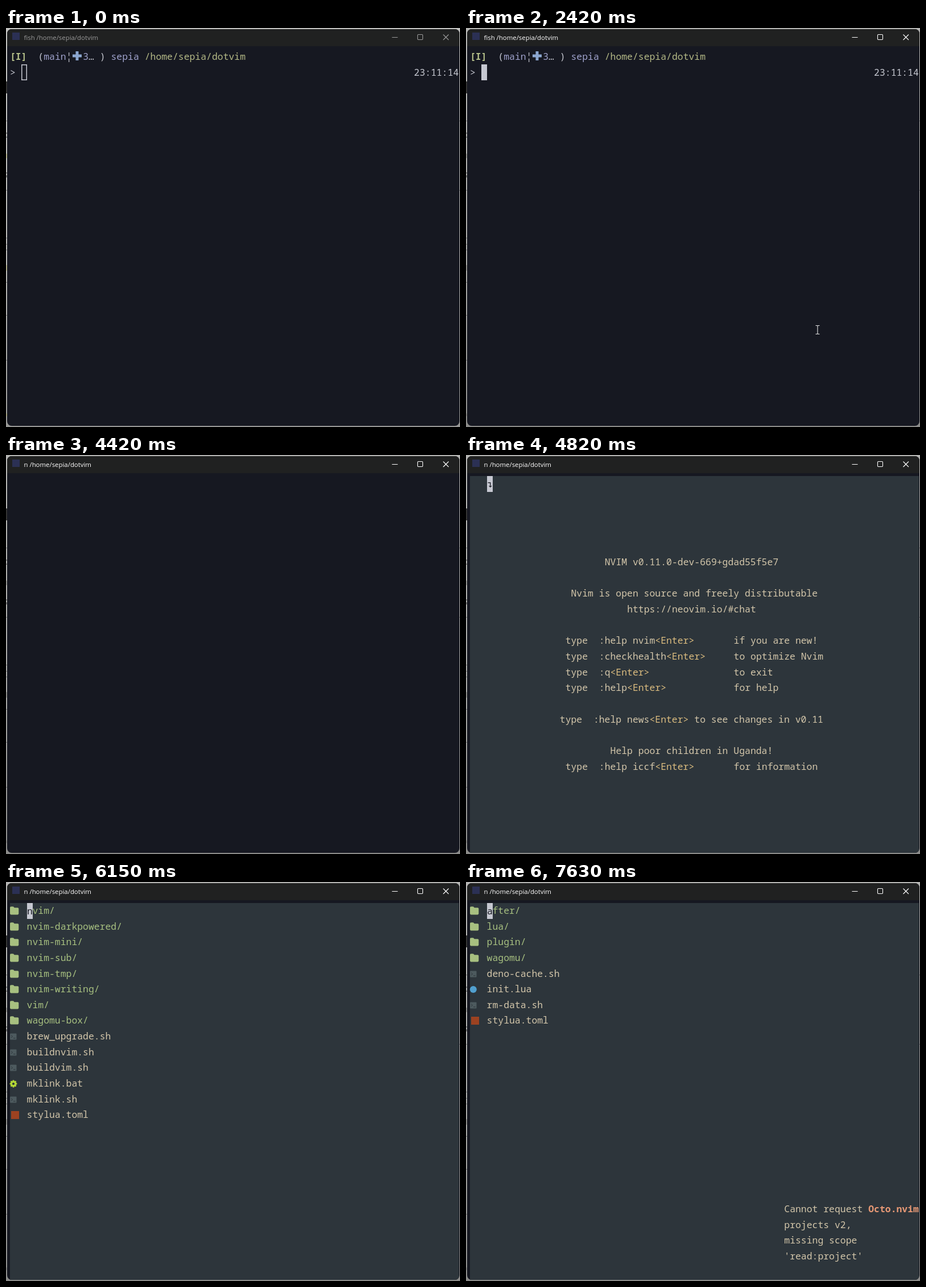
These frames come from a looping animation (798x702 px, 8 s). An HTML page:

```html
<!DOCTYPE html>
<html lang="en">
<head>
<meta charset="utf-8">
<title>Terminal session</title>
<style>
html, body { margin: 0; width: 100%; height: 100%; overflow: hidden; background: #b4b4b2; }
#stage { position: absolute; left: 0; top: 0; width: 798px; height: 702px; overflow: hidden; background: linear-gradient(#c2c2c0, #b4b4b2 60%, #989896); }
#stage.focus { background: linear-gradient(#b6b6b4, #a6a6a4 60%, #8c8c8a); }
#stage * { position: absolute; }
#stage span span { position: static; }
.mark { background: #333; }
.tint { background: #a3a05c; }
.focus .tint { background: #70706c; }
#view { left: 1.5px; top: 1.5px; width: 795px; height: 698.5px; border-radius: 8px; overflow: hidden; background: #161821; }
#page { left: -1.5px; top: -1.5px; width: 798px; height: 702px; }
#bar { left: 0; top: 0; width: 798px; height: 31.5px; background: #202121; color: #9b9b9b; }
.focus #bar { color: #fff; }
#name { left: 31.5px; top: 7px; font: 11.4px/19px 'Open Sans', 'Noto Sans', sans-serif; white-space: pre; }
#logo { left: 11px; top: 8px; width: 13px; height: 13px; background: #2b3054; }
.cell { font: 16.4375px/27.64px 'Noto Sans Mono', 'DejaVu Sans Mono', monospace; white-space: pre; }
.scene { left: 0; top: 0; width: 798px; height: 702px; display: none; }
#nvim { left: 7px; top: 37px; width: 789px; height: 664px; background: #2d353b; display: none; }
#cursor { width: 10px; height: 28px; background: #c6c8d1; color: #161821; }
#cursor.hollow { background: none; box-shadow: inset 0 0 0 1.5px #c6c8d1; }
#shell { color: #c6c8d1; }
#intro, #list, #sub, #note { color: #d3c6aa; }
.ok { color: #b9c48c; }
.path { color: #b4b986; }
.git { color: #9fa2cb; }
.dir { color: #a7c080; }
.key { color: #dbbc7f; }
.warn { color: #e69875; }
b { position: static !important; }
svg { overflow: visible; }
</style>
</head>
<body>
<div id="stage">
  <div id="marks"></div>
  <div id="view"><div id="page">
    <div id="bar">
      <div id="logo"></div>
      <div id="name"></div>
      <svg width="798" height="32" fill="none" stroke="currentColor" stroke-width="1.1">
        <path d="M678.5 16.5h10M768.5 11.5l9.5 9.5m0-9.5l-9.5 9.5"/>
        <rect x="723.5" y="11.5" width="9" height="9" rx="1.2"/>
      </svg>
    </div>
    <div id="nvim"></div>
    <div class="scene" id="shell"></div>
    <div class="scene" id="intro"></div>
    <div class="scene" id="list"></div>
    <div class="scene" id="sub"></div>
    <div class="scene" id="note"></div>
    <div class="cell" id="cursor"></div>
    <svg id="mouse" width="1" height="1" fill="none" stroke="#e8e8e8" stroke-width="1.1">
      <path d="M-3.5-7.5h2.5l1 .8 1-.8h2.5M0-7v14M-3.5 7.5h2.5l1-.8 1 .8h2.5"/>
    </svg>
  </div></div>
</div>
<script>
const LOOP = 8000, CW = 9.8625, RH = 27.64, LEFT = 7, TOP = 37;
const $ = id => document.getElementById(id);
const colX = c => LEFT + c * CW, rowY = r => TOP + r * RH;

function put(scene, row, col, html, cls = '') {
  const el = document.createElement('span');
  el.className = 'cell ' + cls;
  el.style.left = colX(col) + 'px';
  el.style.top = rowY(row) - 1 + 'px';
  el.innerHTML = html;
  $(scene).append(el);
  return el;
}

function icon(scene, row, shape) {
  $(scene).insertAdjacentHTML('beforeend',
    `<svg width="20" height="28" style="left:${LEFT}px;top:${rowY(row)}px">${shape}</svg>`);
}

const teeth = [0, 45, 90, 135].map(a =>
  `<rect x="4.4" y="11.6" width="3.2" height="12.8" rx="1" transform="rotate(${a} 6 18)"/>`).join('');
const ICONS = {
  dir: '<path fill="#a7c080" d="M0 8q0-1.8 1.8-1.8h4l2 2h5.7q1.8 0 1.8 1.8v8.6q0 1.8-1.8 1.8H1.8Q0 20.4 0 18.6z"/>',
  sh: '<rect y="8.5" width="11.5" height="11" rx="1" fill="#4d5a5e"/><path d="M2 11.5l2.5 2.3L2 16m4 .8h3.5" fill="none" stroke="#2d353b"/>',
  bat: `<g fill="#b5d936" transform="translate(0 -4)">${teeth}<circle cx="6" cy="18" r="4.8"/><circle cx="6" cy="18" r="2.1" fill="#2d353b"/></g>`,
  toml: '<rect x="2" y="7" width="14" height="14" fill="#9c4221"/>',
  lua: '<circle cx="5.8" cy="14" r="6" fill="#51a0cf"/>'
};

function listing(scene, names) {
  names.forEach((name, row) => {
    const type = name.endsWith('/') ? 'dir' : name.split('.').pop();
    icon(scene, row, ICONS[type]);
    put(scene, row, 3, name, type === 'dir' ? 'dir' : '');
  });
}

// Shell prompt
put('shell', 0, 0, '<b>[I]</b>', 'ok');
put('shell', 0, 5, '(');
put('shell', 0, 6, 'main', 'git');
put('shell', 0, 10, '¦');
$('shell').insertAdjacentHTML('beforeend',
  '<svg width="16" height="16" style="left:117px;top:41px"><path fill="#8ba6cf" d="M5.5 0h5v5.5H16v5h-5.5V16h-5v-5.5H0v-5h5.5z"/></svg>');
put('shell', 0, 13, '3', 'git');
put('shell', 0, 14, '…');
put('shell', 0, 16, ')');
put('shell', 0, 18, 'sepia', 'git');
put('shell', 0, 24, '/home/sepia/dotvim', 'path');
put('shell', 1, 0, '&gt;');
put('shell', 1, 72, '23:11:14');
const typed = put('shell', 1, 2, 'n');

// Editor start screen
const key = '<span class="key">&lt;Enter&gt;</span>';
[
  [5, 24, 'NVIM v0.11.0-dev-669+gdad55f5e7'],
  [7, 18, 'Nvim is open source and freely distributable'],
  [8, 28, 'https://neovim.io/#chat'],
  [15, 16, `type  :help news${key} to see changes in v0.11`],
  [17, 25, 'Help poor children in Uganda!']
].forEach(line => put('intro', ...line));
[
  [10, 'help nvim', 'if you are new!'],
  [11, 'checkhealth', 'to optimize Nvim'],
  [12, 'q', 'to exit'],
  [13, 'help', 'for help'],
  [18, 'help iccf', 'for information']
].forEach(([row, cmd, why]) => {
  put('intro', row, 17, `type  :${cmd}${key}`);
  put('intro', row, 47, why);
});
const eol = put('intro', 0, 3, '↴');
eol.style.color = '#56635f';

listing('list', ['nvim/', 'nvim-darkpowered/', 'nvim-mini/', 'nvim-sub/', 'nvim-tmp/',
  'nvim-writing/', 'vim/', 'wagomu-box/', 'brew_upgrade.sh', 'buildnvim.sh',
  'buildvim.sh', 'mklink.bat', 'mklink.sh', 'stylua.toml']);
listing('sub', ['after/', 'lua/', 'plugin/', 'wagomu/', 'deno-cache.sh', 'init.lua',
  'rm-data.sh', 'stylua.toml']);
['Cannot request', 'projects v2,', 'missing scope', "'read:project'"]
  .forEach((text, i) => put('note', 19 + i, 56, text));
put('note', 19, 71, '<b>Octo.nvim</b>', 'warn');

// Slivers of the page behind the window: x, y, height, tinted
[[0, 94, 21], [0, 163, 1], [796, 163, 1], [0, 184, 2], [0, 191, 2], [0, 221, 8, 1], [0, 254, 2],
 [0, 259, 4], [0, 285, 1], [796, 285, 1], [0, 369, 1], [0, 380, 1], [0, 390, 1], [0, 417, 10, 1],
 [0, 447, 1], [0, 505, 1], [0, 584, 1], [0, 678, 5, 1]].forEach(([x, y, h, tint]) => {
  const el = document.createElement('div');
  el.className = tint ? 'tint' : 'mark';
  el.style.cssText = `left:${x}px;top:${y}px;width:2px;height:${h}px;opacity:${h > 10 ? 1 : .5}`;
  $('marks').append(el);
});

// Steps: start, scene, title command, cursor [row, col, character]
const STEPS = [
  [0, 'shell', 'fish', [1, 2, '']],
  [3940, 'shell', 'fish', [1, 3, '']],
  [4150, 'shell', 'n', [2, 0, '']],
  [4290, '', 'n', [0, 0, '']],
  [4420, '', 'n', null],
  [4820, 'intro', 'n', [0, 3, '↴']],
  [5020, 'intro', 'n', null],
  [5620, 'intro', 'n', [0, 3, '↴']],
  [6150, 'list', 'n', [0, 3, 'n']],
  [6950, 'list', 'n', [1, 3, 'n']],
  [7360, 'list', 'n', [0, 3, 'n']],
  [7630, 'sub', 'n', [0, 3, 'a']]
];
const FOCUS = 2290, TYPE = 3940, MOUSE = 1250, TICK = 71, NOTE = 6220;

const show = (el, on) => { el.style.display = on ? 'block' : 'none'; };

function drawMouse(t) {
  show($('mouse'), t >= MOUSE && t < TYPE);
  const u = Math.min(9, Math.max(0, Math.floor((t - MOUSE) / TICK))) / 9;
  const k = u * u * (3 - 2 * u);
  const x = 598 - 22 * k + 42 * k * k, y = 667 - 136 * k;
  $('mouse').style.left = Math.round(x) + 'px';
  $('mouse').style.top = Math.round(y) + 'px';
}

function draw(t) {
  const [, scene, cmd, cur] = STEPS.findLast(s => t >= s[0]);
  for (const id of ['shell', 'intro', 'list', 'sub']) show($(id), id === scene);
  show($('nvim'), t >= 4820);
  show($('note'), t >= NOTE);
  show(typed, t >= TYPE);
  $('stage').classList.toggle('focus', t >= FOCUS);
  $('name').textContent = cmd + ' /home/sepia/dotvim';
  const c = $('cursor');
  show(c, cur);
  if (cur) {
    c.style.top = Math.floor(rowY(cur[0])) + 'px';
    c.style.left = Math.round(colX(cur[1])) + 'px';
    c.textContent = cur[2];
    c.classList.toggle('hollow', t < FOCUS);
  }
  drawMouse(t);
}

const start = performance.now();
function frame() {
  draw((performance.now() - start) % LOOP);
  requestAnimationFrame(frame);
}
frame();
</script>
</body>
</html>
```
